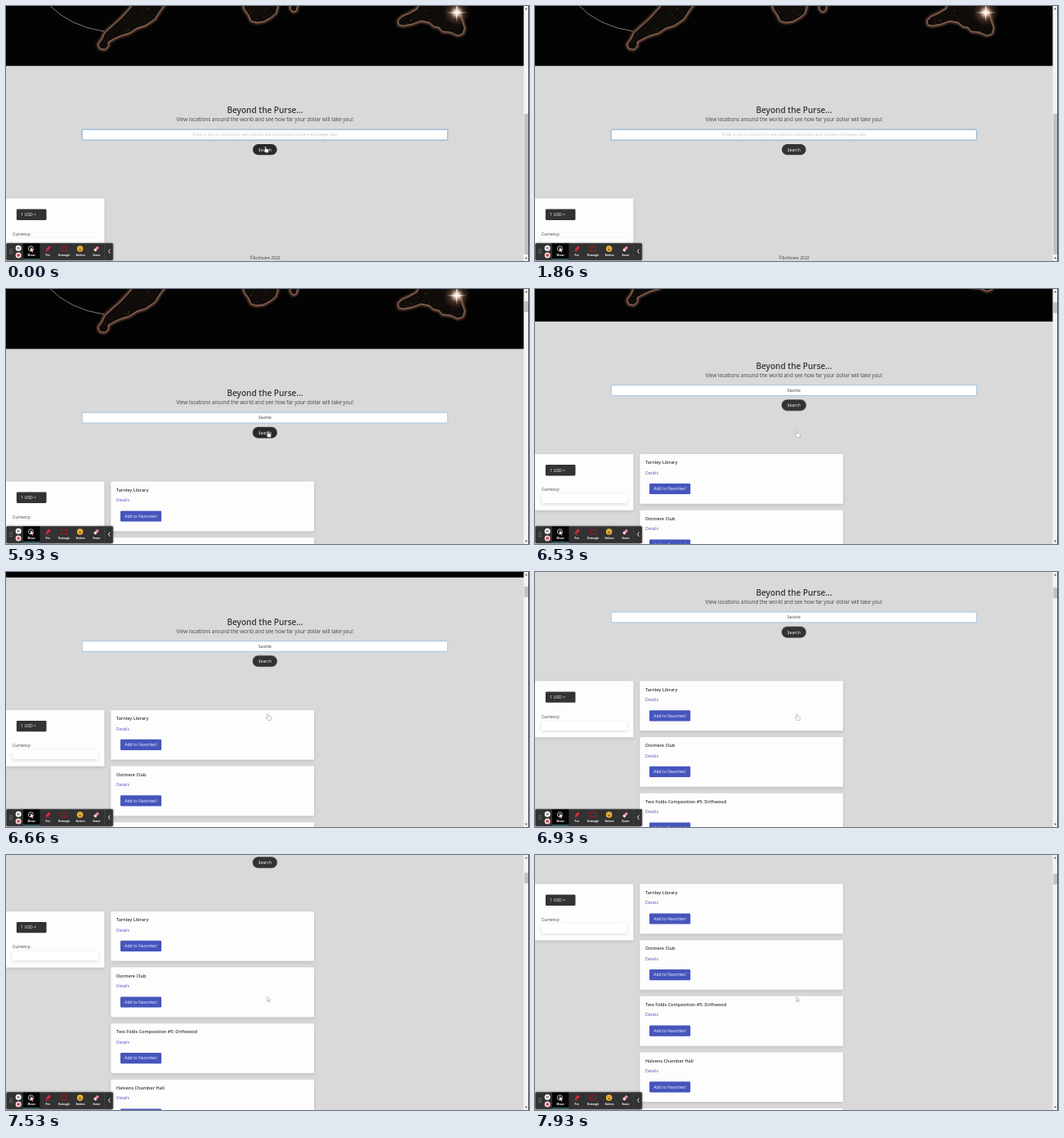
An HTML page that plays this animation: 640x312 px, repeating every 8000 ms.

```html
<!DOCTYPE html>
<html lang="en">
<head>
<meta charset="utf-8">
<title>Travel search</title>
<style>
  html, body { margin: 0; width: 100%; height: 100%; overflow: hidden; background: #d9d9d9; }
  svg { display: block; width: 100vw; height: 100vh; }
  text { font: 5.05px "Open Sans", "Noto Sans", sans-serif; fill: #363636; white-space: pre; }
  .mid { text-anchor: middle; }
  .head { font-size: 10px; font-weight: 600; }
  .sub { font-size: 6.32px; fill: #444; }
  .name { font-size: 5.5px; font-weight: 600; }
  .light { fill: #fff; }
  .link { fill: #5750bd; }
  .tool { font-size: 2.85px; font-weight: 700; fill: #fff; text-anchor: middle; }
</style>
</head>
<body>
<svg viewBox="0 0 640 312" preserveAspectRatio="none">
  <defs>
    <filter id="blur" x="-20%" y="-20%" width="140%" height="140%"><feGaussianBlur stdDeviation="1.4"/></filter>
    <filter id="shade" x="-10%" y="-20%" width="120%" height="150%">
      <feDropShadow dx="0" dy="1.5" stdDeviation="2.2" flood-color="#0a0a0a" flood-opacity=".13"/>
    </filter>
    <filter id="rim" x="-5%" y="-30%" width="110%" height="160%">
      <feDropShadow dx="0" dy="0" stdDeviation=".9" flood-color="#000" flood-opacity=".55"/>
    </filter>
    <radialGradient id="flare">
      <stop offset="0" stop-color="#fff"/>
      <stop offset=".2" stop-color="#ffe6cf" stop-opacity=".85"/>
      <stop offset=".5" stop-color="#b98262" stop-opacity=".32"/>
      <stop offset="1" stop-color="#7a4a32" stop-opacity="0"/>
    </radialGradient>
    <path id="land" d="M158-6 L152 3 L141 15 L131 24 L121 33 L118 40 L113 47 L115 52 L121 53 L125 49 L125 44 L132 40 L141 36 L151 33 L160 27 L170 24 L182 16 L187 8 L197-6Z
      M289-6 L292 4 L297 11 L300 18 L306 20 L315 19 L324 14 L330 9 L332 2 L333-6Z
      M349-6 L348 3 L351 7 L355 6 L358-6Z
      M508-6 L503 4 L494 9 L485 13 L480 18 L481 23 L486 24 L497 22 L508 18 L518 20 L524 25 L530 26 L534 31 L544 32 L553 36 L559 34 L561 27 L557 15 L553 5 L548-6Z"/>
    <clipPath id="coast"><use href="#land"/></clipPath>
    <clipPath id="hero"><rect y="-80" width="634" height="153"/></clipPath>
  </defs>

  <rect width="640" height="312" fill="#d9d9d9"/>
  <g id="page">
    <rect y="-80" width="634" height="153.3" fill="#030303"/>
    <g clip-path="url(#hero)">
      <use href="#land" fill="none" stroke="#95654f" stroke-width="3.4" stroke-linejoin="round" filter="url(#blur)"/>
      <use href="#land" fill="#0f0c0a" stroke="#a07a66" stroke-width=".8" stroke-linejoin="round"/>
      <g id="lights" clip-path="url(#coast)"></g>
      <path d="M52-2 Q78 25 120 31" fill="none" stroke="#8d8885" stroke-width=".9"/>
      <circle cx="551.5" cy="8" r="17" fill="url(#flare)"/>
      <path d="M551.5-5 l.9 12 12 1 -12 1 -.9 11 -.9-11 -12-1 12-1z" fill="#fff" opacity=".7"/>
    </g>

    <text class="mid head" x="317" y="131.3">Beyond the Purse...</text>
    <text class="mid sub" x="316.7" y="141.3">View locations around the world and see how far your dollar will take you!</text>
    <rect id="glow" x="92.2" y="150.2" width="449" height="14.6" rx="2" fill="#5b9bd5" opacity=".18"/>
    <rect id="field" x="93.2" y="151.2" width="447.2" height="12.7" rx="1.2" fill="#fff" stroke-width=".7"/>
    <text class="mid" id="entry" x="316.8" y="159.4"></text>
    <rect id="ring" x="301.4" y="168.5" width="30.8" height="14.4" rx="7.2" fill="#4a4a4a" opacity=".45"/>
    <rect id="go" x="302" y="169.1" width="29.6" height="13.2" rx="6.6" fill="#333"/>
    <text class="mid light" x="316.8" y="177.7">$earch</text>

    <rect y="235.6" width="120.2" height="68.6" fill="#fdfdfd" filter="url(#shade)"/>
    <rect x="12.9" y="248.6" width="36.6" height="13.3" rx="1.3" fill="#333"/>
    <text class="light" x="18.3" y="257.1">1 USD =</text>
    <text x="8" y="280.9">Currency:</text>
    <rect x="8" y="284.6" width="104.4" height="11" rx="1.3" fill="#fff" filter="url(#shade)"/>
    <g id="cards"></g>
    <text class="mid" id="foot" x="317" y="310.2">©$oltivare 2022</text>
  </g>

  <rect x="633.5" width="6.5" height="312" fill="#f4f4f4"/>
  <rect id="thumb" x="634.2" width="4.8" fill="#c1c1c1"/>
  <path d="M635 4.2 l1.6-2 1.6 2z M635 307.8 l1.6 2 1.6-2z" fill="#505050"/>
  <rect x="639.2" width=".8" height="312" fill="#2a2a2a"/>

  <g id="bar">
    <rect x=".5" y="290.2" width="130.4" height="20.8" rx="1.6" fill="#333" stroke="#555" stroke-width=".4" filter="url(#rim)"/>
    <rect x="21" y="290.5" width="20.4" height="20" fill="#050505"/>
    <rect x="21" y="309.4" width="20.4" height="1" fill="#5aa3b3"/>
    <path d="M5 297.5v6.2M7 297.5v6.2" stroke="#bbb" stroke-width=".9" stroke-dasharray=".9 1.4"/>
    <circle cx="15.2" cy="296.2" r="3.5" fill="#fff"/>
    <path d="M14.4 294.8v2.8M16 294.8v2.8" stroke="#333" stroke-width=".8"/>
    <circle cx="15.2" cy="305" r="3.5" fill="#f3dede"/>
    <rect x="13.6" y="303.4" width="3.2" height="3.2" rx=".5" fill="#df3440"/>
    <circle cx="30.4" cy="296.8" r="3" fill="none" stroke="#eee" stroke-width=".8"/>
    <path d="M30 295.4l4 3.4-1.9.2 1 2-.8.4-1-2-1.3 1.2z" fill="#fff" stroke="#d9716b" stroke-width=".3"/>
    <path d="M48.6 299.8l1-3 3.2-3.2 2 2-3.2 3.2z" fill="#e2263c"/>
    <path d="M48.6 300.4h4" stroke="#e2263c" stroke-width=".6"/>
    <rect x="67.8" y="294.3" width="6.6" height="5.2" fill="none" stroke="#a3172b" stroke-width="1"/>
    <circle cx="90.6" cy="297" r="3.7" fill="#f5bd38"/>
    <path d="M88.6 297.5q2 3.4 4 0z" fill="#7b3d17"/>
    <path d="M88.7 295.8h1.2M91.3 295.8h1.2" stroke="#5b3513" stroke-width=".8"/>
    <path d="M107.2 298.4l4.4-4.6 2.4 2-4.4 4.6z" fill="#ee8d9d"/>
    <path d="M107.2 298.4l1.6-1.7 2.4 2-1.6 1.7z" fill="#f6e2e3"/>
    <g id="tools"></g>
    <path d="M120.6 291v19" stroke="#555" stroke-width=".5"/>
    <path d="M127.4 297.6l-2 2.6 2 2.6" fill="none" stroke="#fff" stroke-width=".9"/>
  </g>

  <g id="mouse">
    <path id="hand" d="M0 .6 Q.8-.4 1.5.6 V3 L4.4 3.7 Q5 4 4.8 4.9 L4.3 7.8 H.7 L-1.6 5 Q-1.7 4.1-.9 4.4 L0 5.1Z" fill="#fff" stroke="#222" stroke-width=".5"/>
    <path id="arrow" d="M0 0V5.6L1.3 4.5 2.2 6.5 3.1 6.1 2.2 4.2 3.9 4.1Z" fill="#fff" stroke="#777" stroke-width=".45"/>
    <path id="beam" d="M-1-3h2M0-3v6M-1 3h2" fill="none" stroke="#333" stroke-width=".5"/>
  </g>
</svg>
<script>
const $ = id => document.getElementById(id);
const LOOP = 8000, RESULTS = 5800, CLICK = 5200;
const WORD = "Seattle", HINT = "Enter a city or country to see popular attractions and current exchange rate";
const keyTimes = [2060, 2400, 2530, 2930, 3130, 3330, 3530];
const places = ["Tarnley Library", "Ostmere Club", "Two Folds Composition #5: Driftwood", "Halvens Chamber Hall", "Quillmere Garden"];
const tools = ["Mouse", "Pen", "Rectangle", "Stickers", "Eraser"];
const scrollKeys = [[6400, 0], [6660, 66.5], [6930, 102], [7200, 136], [7530, 166.6], [7665, 166.6], [7930, 200]];
const xKeys = [[60, 316.8], [860, 326], [4330, 326], [4660, 319.8]];
const yKeys = [[60, 171.6], [860, 158], [4330, 158], [4660, 173.6]];

// Linear interpolation through [time, value] pairs
function track(keys, t) {
  if (t <= keys[0][0]) return keys[0][1];
  for (let i = 1; i < keys.length; i++) {
    const [a, u] = keys[i - 1], [b, v] = keys[i];
    if (t < b) return u + (v - u) * (t - a) / (b - a);
  }
  return keys[keys.length - 1][1];
}

function show(id, on) { $(id).style.display = on ? "" : "none"; }

$("cards").innerHTML = places.map((name, i) => `<g transform="translate(128.4 ${235.6 + i * 68.6})">
  <rect width="248.6" height="60.6" rx="1.4" fill="#fdfdfd" filter="url(#shade)"/>
  <text class="name" x="6.6" y="12.3">${name}</text>
  <text class="link" x="6.6" y="24.7">Details</text>
  <rect x="11.6" y="35.8" width="50.2" height="13.2" rx="1.3" fill="#4655bd"/>
  <text class="mid light" x="36.7" y="44.3">Add to Favorites!</text></g>`).join("");

$("tools").innerHTML = tools.map((name, i) => `<text class="tool" x="${31.2 + i * 19.95}" y="305.8">${name}</text>`).join("");

let seed = 17;
const rand = () => (seed = seed * 16807 % 2147483647) / 2147483647;
const regions = [[112, 88], [288, 70], [479, 82]];
let dots = "";
for (let i = 0; i < 240; i++) {
  const [x, w] = regions[i % 3];
  dots += `<circle cx="${x + rand() * w}" cy="${rand() * 52}" r="${0.2 + rand() * 0.35}" fill="#c79a62" opacity="${0.25 + rand() * 0.6}"/>`;
}
$("lights").innerHTML = dots;

function draw(t) {
  const scroll = track(scrollKeys, t), found = t >= RESULTS, clicked = t >= CLICK;
  $("page").setAttribute("transform", `translate(0 ${-scroll})`);
  show("cards", found);
  show("foot", !found);
  $("thumb").setAttribute("y", found ? 15 + scroll * 0.04 : 132);
  $("thumb").setAttribute("height", found ? 13 : 172);

  const typed = WORD.slice(0, keyTimes.filter(k => t >= k).length);
  $("entry").textContent = typed || HINT;
  $("entry").style.fill = typed ? "#444" : "#c4c4c4";
  show("glow", !clicked);
  $("field").setAttribute("stroke", clicked ? "#86b3d8" : "#629ed1");

  const x = track(xKeys, t), y = track(yKeys, t);
  const visible = t < 1330 || t >= 4330;
  const overField = y < 164.5, overButton = y >= 169 && t < 7000;
  $("mouse").setAttribute("transform", `translate(${x} ${y})`);
  show("mouse", visible);
  show("beam", overField);
  show("hand", overButton);
  show("arrow", !overField && !overButton);
  $("hand").setAttribute("stroke", t > 6500 ? "#888" : "#222");
  show("ring", clicked);
  $("go").setAttribute("fill", visible && overButton && scroll === 0 ? "#292929" : "#333");
}

const start = performance.now();
function tick() {
  draw((performance.now() - start) % LOOP);
  requestAnimationFrame(tick);
}
draw(0);
requestAnimationFrame(tick);
</script>
</body>
</html>
```
